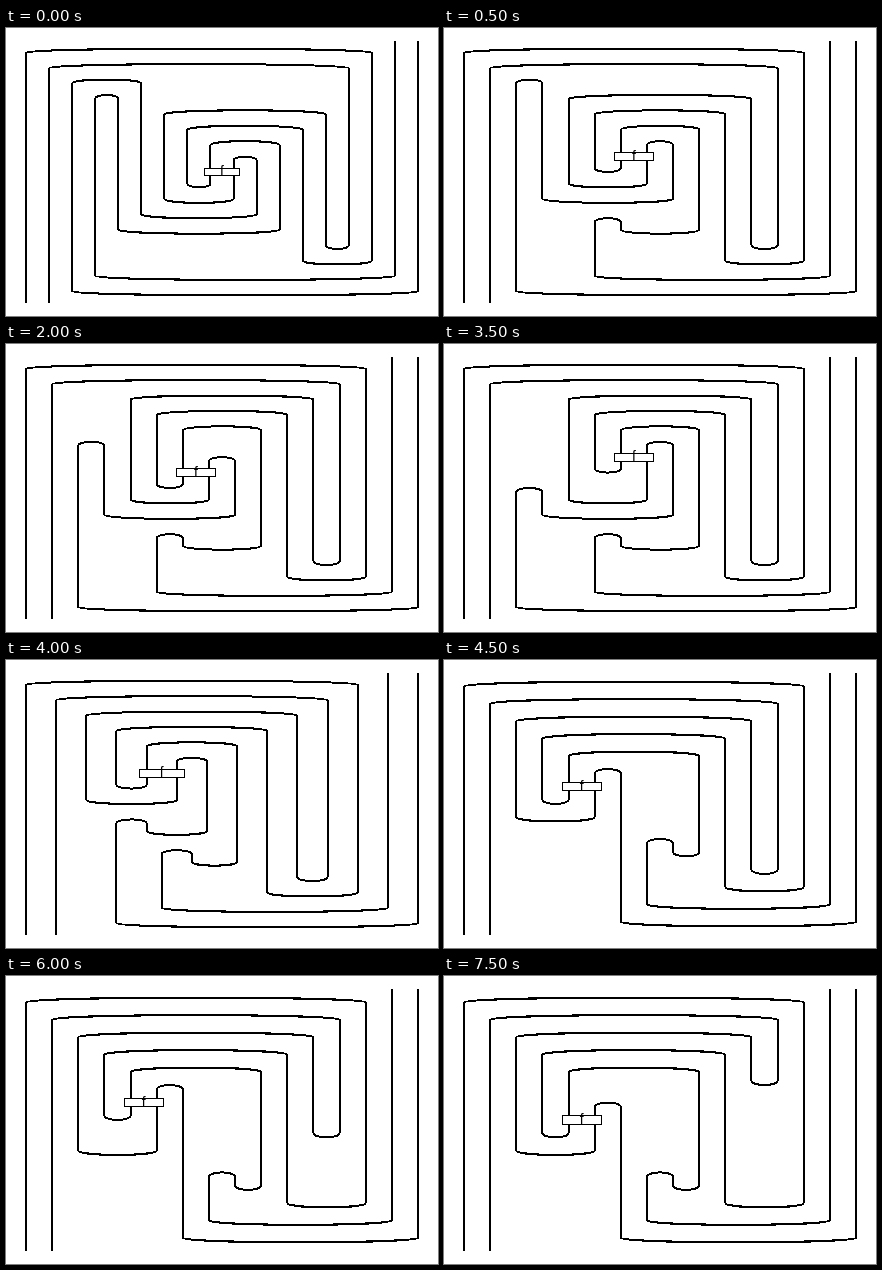
Recreate the animation shown at these times as an HTML page. Size 432 by 288 pixels, loop 8 s.

```html
<!DOCTYPE html>
<html lang="en">
<head>
<meta charset="utf-8">
<title>String diagram</title>
<style>
  html, body { margin: 0; width: 100%; height: 100%; overflow: hidden; background: #fff; }
  svg { display: block; }
  path, rect { stroke: #000; shape-rendering: crispEdges; }
  path { fill: none; stroke-width: 2; }
  rect { fill: #fff; stroke-width: 1; }
  text { font: 14px "Liberation Sans", Arial, sans-serif; text-anchor: middle; }
</style>
</head>
<body>
<svg width="432" height="288" viewBox="0 0 432 288">
  <path id="strands"/>
  <rect id="box"/>
  <text id="label">f</text>
</svg>
<script>
const LEFT = 20, WIDTH = 392, TOP = 13, HEIGHT = 262;
const STEP = 500, STEPS = 16;

// Rows run from top to bottom: "n" opens two strands, "u" joins two, "box" sits on two.
const parse = text => text.split(', ').map(row => {
  const [kind, a, b] = row.split(' ');
  return { kind, a: +a, b: +b };
});

// From step `first` on, the row at index `from` trades places by `dir` once per step.
const phases = [
  { first: 0, cols: 18, from: 0, dir: 0, rows: parse(
    'n 0 15, n 1 14, n 2 5, n 3 4, n 6 13, n 7 12, n 8 11, n 9 10, box 8 9, ' +
    'u 7 8, u 6 9, u 5 10, u 4 11, u 13 14, u 12 15, u 3 16, u 2 17') },
  { first: 1, cols: 16, from: 2, dir: 1, rows: parse(
    'n 0 13, n 1 12, n 2 3, n 4 11, n 5 10, n 6 9, n 7 8, box 6 7, ' +
    'u 5 6, u 4 7, u 3 8, n 5 6, u 6 9, u 11 12, u 10 13, u 5 14, u 2 15') },
  { first: 8, cols: 14, from: 0, dir: 0, rows: parse(
    'n 0 11, n 1 10, n 2 9, n 3 8, n 4 7, n 5 6, box 4 5, u 3 4, u 2 5, ' +
    'n 3 4, u 4 6, n 4.5 5.5, u 5.5 7, u 9 10, u 8 11, u 4.5 12, u 3 13') },
  { first: 9, cols: 16, from: 11, dir: -1, rows: parse(
    'n 0 13, n 1 12, n 2 11, n 3 10, n 4 9, n 5 6, box 4 5, u 3 4, u 2 5, ' +
    'n 7 8, u 8 9, u 11 12, u 10 13, u 7 14, u 6 15') }
];

const [strands, box, label] = ['strands', 'box', 'label'].map(id => document.getElementById(id));

function setAttributes(element, values) {
  for (const name in values) element.setAttribute(name, values[name]);
}

function rowsAt(phase, step) {
  const rows = phase.rows.slice();
  const [moving] = rows.splice(phase.from, 1);
  rows.splice(phase.from + phase.dir * (step - phase.first), 0, moving);
  return rows;
}

function drawBox(center, y, column, bend) {
  setAttributes(box, {
    x: center - column * 0.75, y: y - bend, width: column * 1.5, height: bend * 2
  });
  setAttributes(label, { x: center, y: y + 4 });
}

function draw(step) {
  const phase = phases.findLast(p => p.first <= step);
  const rows = rowsAt(phase, step);
  const column = WIDTH / (phase.cols - 1);
  const rowHeight = HEIGHT / rows.length;
  const bend = rowHeight / 4;
  const xOf = col => LEFT + col * column;
  const open = new Map([[phase.cols - 2, TOP], [phase.cols - 1, TOP]]);
  let d = '';

  const close = (col, y) => {
    d += `M${xOf(col)} ${open.get(col)}V${y}`;
    open.delete(col);
  };

  rows.forEach(({ kind, a, b }, i) => {
    const y = TOP + (i + 0.5) * rowHeight;
    const xa = xOf(a), xb = xOf(b);
    if (kind === 'box') return drawBox((xa + xb) / 2, y, column, bend);
    const isCap = kind === 'n';
    const end = isCap ? y + bend : y - bend;
    d += `M${xa} ${end}A${(xb - xa) / 2} ${bend} 0 0 ${+isCap} ${xb} ${end}`;
    for (const col of [a, b]) {
      if (isCap) open.set(col, end);
      else close(col, end);
    }
  });
  for (const col of [...open.keys()]) close(col, TOP + HEIGHT);
  strands.setAttribute('d', d);
}

const start = performance.now();
let shown = -1;

function tick() {
  const step = Math.floor((performance.now() - start) / STEP) % STEPS;
  if (step !== shown) draw(shown = step);
  requestAnimationFrame(tick);
}
tick();
</script>
</body>
</html>
```
